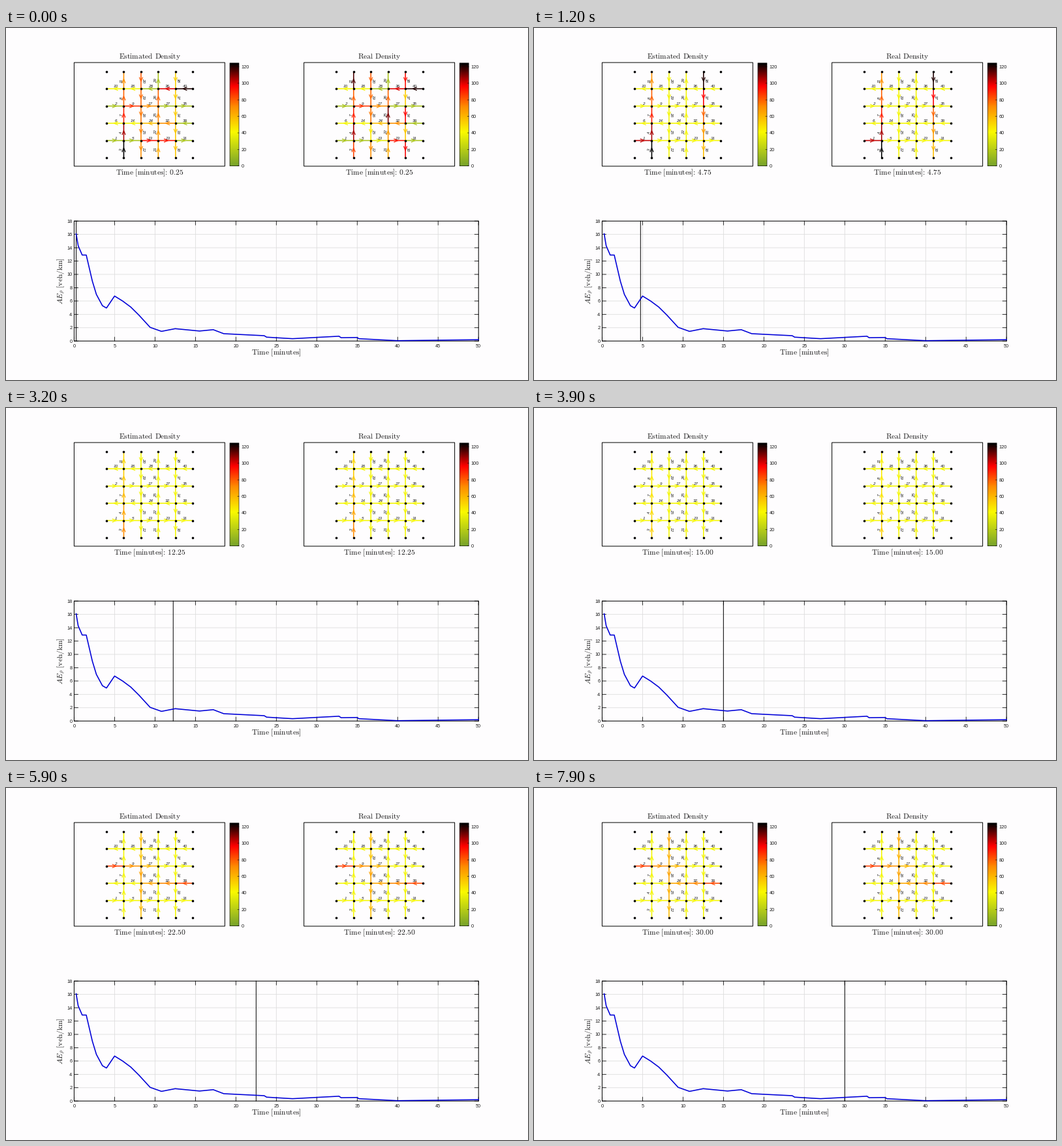
These frames come from a looping animation (800 px wide and 540 px high, 8000 ms). A matplotlib script:

```python
import numpy as np
import matplotlib.pyplot as plt
from math import ceil
from matplotlib.animation import FuncAnimation
from matplotlib.collections import LineCollection
from matplotlib.colors import LinearSegmentedColormap, Normalize
from matplotlib.patches import Rectangle

plt.rcParams["font.family"] = "Liberation Sans"
plt.rcParams["mathtext.fontset"] = "cm"

W, H, DPI = 800, 540, 100
FRAMES, INTERVAL = 80, 100
PX = 72 / DPI
STEP = 26.45
VMAX, CALM = 124.5, 39
CMAP = LinearSegmentedColormap.from_list("density", [
    (0, "#77a22c"), (0.33, "#fafa00"), (0.58, "#ff8c00"),
    (0.78, "#ff0000"), (1, "#000000")])

# Street links in driving order; +1 heads right or down
ROWS = [(1, (40, 36, 28, 18, 10), -1), (2, (2, 9, 17, 27, 35), 1),
        (3, (39, 32, 24, 14, 6), -1), (4, (1, 5, 13, 23, 31), 1)]
COLS = [(1, (3, 4, 7, 8, 11), -1), (2, (20, 19, 16, 15, 12), 1),
        (3, (21, 22, 25, 26, 29), -1), (4, (38, 37, 34, 33, 30), 1)]

# Queues: links, extra density, share passed on to the next link,
# then the minutes of rise start, rise end, fall start, fall end
INITIAL = (-1, 0, 0.25, 4)
LASTING = (90, 99)
QUEUES = [
    ((40, 36), 82, 0.75, *INITIAL),
    ((9, 17), 49, 0.65, *INITIAL),
    ((32, 24), 32, 0.6, *INITIAL),
    ((13, 23), 56, 0.97, *INITIAL),
    ((20, 19, 16, 15, 12), 42, 0.94, *INITIAL),
    ((26, 25, 22, 21), 40, 0.85, *INITIAL),
    ((38, 37, 34, 33, 30), 14, 1.05, *INITIAL),
    ((1, 2, 5, 27, 28, 29, 31, 35, 39), -23, 1, *INITIAL),
    ((3, 4, 7, 8, 11), 86, 0.78, -1, 0, 4.75, 17),
    ((38, 37, 34, 33, 30), 82, 0.7, 0.25, 4.5, 4.75, 8.5),
    ((1,), 65, 1, 1, 4.5, 4.75, 7.5),
    ((2, 9, 17), 47, 0.65, 15, 17, *LASTING),
    ((16, 15, 12), 27, 0.85, 15, 17, *LASTING),
    ((39, 32, 24), 45, 0.75, 20, 22, *LASTING),
    ((20, 19), 25, 0.9, 18, 24, *LASTING),
]
REAL_EXTRA = [
    ((38, 34, 30), 42, 1, *INITIAL),
    ((11, 25), 45, 0.85, *INITIAL),
    ((3, 15), -40, 0.7, *INITIAL),
    ((13,), -62, 1, *INITIAL),
]

ERROR = [(.25, 16.1), (.5, 14.3), (1, 12.9), (1.5, 12.9), (2.25, 9),
         (2.75, 7), (3.5, 5.3), (4, 4.95), (5, 6.75), (6, 6), (7, 5.1),
         (8, 3.9), (9.4, 2.05), (10.8, 1.45), (12.5, 1.85), (15.5, 1.5),
         (17.2, 1.7), (18.5, 1.1), (23.5, .8), (23.8, .58), (27, .35),
         (32.75, .72), (33, .5), (35, .53), (35.2, .35), (40, .05), (50, .2)]

fig = plt.figure(figsize=(W / DPI, H / DPI), dpi=DPI, facecolor="#fefdfe")
ax = fig.add_axes([0, 0, 1, 1])
ax.axis("off")


def line(x, y, color="black", width=0.8, z=2):
    return ax.plot(x, y, color=color, lw=width * PX, zorder=z, snap=False)[0]


def box(x0, y0, x1, y1, width=1.0):
    ax.add_patch(Rectangle((x0, y0), x1 - x0, y1 - y0, fill=False, snap=False,
                           ec="black", lw=width * PX, zorder=4))


def small(x, y, s, size=7.4, **kw):
    ax.text(x, y, s, fontsize=size * PX, color="#1a1a1a", zorder=6,
            **{"ha": "center", "va": "center_baseline", **kw})


def serif(x, y, s, **kw):
    return ax.text(x, y, s, fontsize=11.5 * PX, color="#1a1a1a", zorder=6,
                   **{"ha": "center", "va": "baseline", **kw})


def roman(s):
    s = s.replace(":", r"\hspace{-0.2}:\hspace{-0.2}")
    return r"$\mathrm{" + s.replace(" ", r"\hspace{0.38}") + "}$"


def link_path(a, b):
    """Shaft and open arrow head of the link from a to b."""
    a, b = np.array(a, float), np.array(b, float)
    u = (b - a) / np.hypot(*(b - a))
    n = np.array([-u[1], u[0]])
    tip = (a + b) / 2 + 2 * u
    return [a, b], [tip - 6.5 * u + 2.6 * n, tip, tip - 6.5 * u - 2.6 * n]


def densities(t, queues):
    d = np.full(41, float(CALM))
    for links, extra, share, *times in queues:
        level = extra * np.interp(t, times, [0, 1, 1, 0])
        for i, k in enumerate(links):
            d[k] += level * share ** i
    return d


class Panel:
    def __init__(self, x0, gx, title, queues):
        self.queues = queues
        box(x0, 53, x0 + 231, 212)
        serif(x0 + 116, 47, roman(title))
        self.clock = serif(x0 + 116, 225, "")
        self.color_bar(x0 + 238.6)

        def node(i, j):
            return gx + i * STEP, 66.8 + j * STEP

        shafts, heads, self.order = [], [], []

        def street(names, heading, at, dx, dy, rot):
            stops = range(6)[::heading]
            for k, p, q in zip(names, stops, stops[1:]):
                a, b = at(p), at(q)
                shaft, head = link_path(a, b)
                shafts.append(shaft)
                heads.append(head)
                self.order.append(k)
                small((a[0] + b[0]) / 2 + dx, (a[1] + b[1]) / 2 + dy, str(k),
                      6.3, style="italic", rotation=rot, va="center")

        for j, names, d in ROWS:
            street(names, d, lambda i: node(i, j), 1, -3.5, 0)
        for i, names, d in COLS:
            street(names, d, lambda j: node(i, j), 3.6 * d, 0.5, -90 * d)

        widths = [1.6 * PX] * 40 + [1.2 * PX] * 40
        self.roads = LineCollection(shafts + heads, cmap=CMAP, zorder=3,
                                    norm=Normalize(0, VMAX),
                                    linewidths=widths, snap=False)
        ax.add_collection(self.roads)
        pts = np.array([node(i, j) for i in range(6) for j in range(6)])
        ax.plot(*pts.T, "o", color="black", ms=3.6 * PX, mew=0, zorder=5,
                snap=False)

    def color_bar(self, x):
        top, low = 53.7, 211.7
        ax.imshow(np.linspace(1, 0, 256)[:, None], cmap=CMAP, vmin=0, vmax=1,
                  extent=(x, x + 14, low, top), aspect="auto", zorder=1)
        box(x, top, x + 14, low, 0.6)
        for v in range(0, 121, 20):
            y = low - v * (low - top) / VMAX
            line([x + 12, x + 14], [y, y], width=0.6, z=5)
            small(x + 17.4, y, str(v), ha="left")

    def show(self, t):
        self.roads.set_array(np.tile(densities(t, self.queues)[self.order], 2))
        self.clock.set_text(roman(f"Time [minutes]: {t:.2f}"))


panels = [Panel(104.4, 154, "Estimated Density", QUEUES),
          Panel(456.6, 506.3, "Real Density", QUEUES + REAL_EXTRA)]

# Error plot
L, R, T, B = 104.4, 724.2, 296.2, 480.2


def px(t):
    return L + np.asarray(t) * (R - L) / 50


def py(v):
    return B - np.asarray(v) * (B - T) / 18


for t in range(0, 51, 5):
    x = px(t)
    line([x, x], [T, B], "#dcdcdc", z=1)
    line([x, x], [B, B - 6])
    line([x, x], [T, T + 6])
    small(x, 487, str(t))
for v in range(0, 19, 2):
    y = py(v)
    line([L, R], [y, y], "#dcdcdc", z=1)
    line([L, L + 6], [y, y])
    line([R, R - 6], [y, y])
    small(L - 3, y, str(v), ha="right")
box(L, T, R, B)
times, errors = np.array(ERROR).T
line(px(times), py(errors), "#0000d8", 1.6, 5)
serif(414.3, 501.3, roman("Time [minutes]"))
serif(84.5, 388, r"$AE_{\rho}$" + roman(" [veh/km]"), rotation=90, va="center")
cursor = line([L, L], [T, B], width=1.0, z=4)

# One unit is one pixel, y runs down
ax.set_xlim(0, W)
ax.set_ylim(H, 0)


def update(i):
    t = 0.25 * ceil(1.5 * i + 1)
    for p in panels:
        p.show(t)
    cursor.set_xdata([px(t)] * 2)
    return []


anim = FuncAnimation(fig, update, frames=FRAMES, interval=INTERVAL,
                     repeat=True, repeat_delay=0, blit=False)
plt.show()
```
